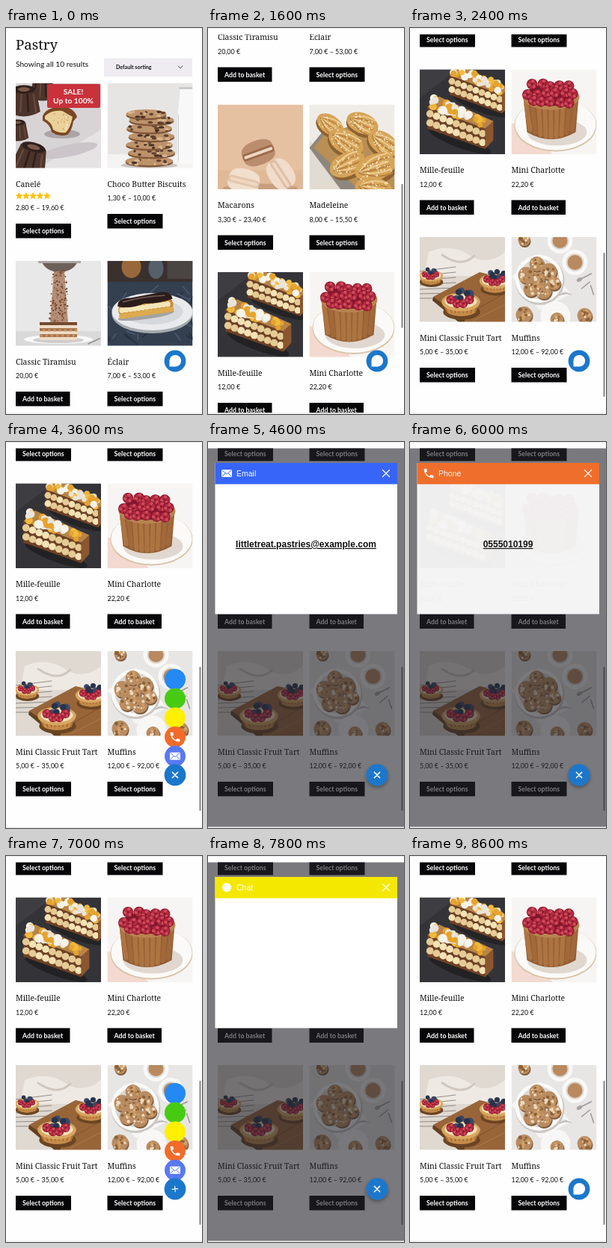
These frames come from a looping animation (262 px wide and 517 px high, 8.8 s). An HTML page:

```html
<!DOCTYPE html>
<html lang="en">
<head>
<meta charset="utf-8">
<style>
html, body { margin: 0; height: 100%; overflow: hidden; background: #fefefe; }
svg { display: block; width: 100vw; height: 100vh; }
text { font-family: Lato, sans-serif; fill: #111; }
.serif { font-family: "Noto Serif", serif; }
.sans { font-family: "Liberation Sans", Arial, sans-serif; }
.bold { font-weight: 700; }
.mid { text-anchor: middle; }
.white { fill: #fff; }
</style>
</head>
<body>
<svg id="stage" viewBox="0 0 262 517"></svg>
<script>
const LOOP = 8800, STEP = 200, MAX_SCROLL = 706;
const stage = document.getElementById('stage');

let seed = 7;
const rnd = (a = 0, b = 1) => {
  seed = (seed * 16807) % 2147483647;
  return a + (b - a) * seed / 2147483647;
};
const many = (n, fn) => Array.from({ length: n }, (_, i) => fn(i)).join('');
const pick = (...list) => list[Math.floor(rnd(0, list.length))];

// Shape helpers
const dot = (x, y, r, f) => `<circle cx="${x}" cy="${y}" r="${r}" fill="${f}"/>`;
const oval = (x, y, rx, ry, f, a = 0) =>
  `<ellipse cx="${x}" cy="${y}" rx="${rx}" ry="${ry}" fill="${f}" transform="rotate(${a} ${x} ${y})"/>`;
const box = (x, y, w, h, f, r = 0) =>
  `<rect x="${x}" y="${y}" width="${w}" height="${h}" rx="${r}" fill="${f}"/>`;
const path = (d, f) => `<path d="${d}" fill="${f}"/>`;
const line = (d, c, w) => `<path d="${d}" fill="none" stroke="${c}" stroke-width="${w}" stroke-linecap="round"/>`;
const put = (x, y, s, more = '') => `<g transform="translate(${x} ${y}) ${more}">${s}</g>`;
const text = (x, y, size, s, cls = '', more = '') =>
  `<text x="${x}" y="${y}" font-size="${size}" class="${cls}" ${more}>${s}</text>`;

// Photos, each 114 by 114
const canele = (x, y, s, a = 0) => put(x, y,
  path('M-14 -12Q0 -20 14 -12L19 14Q0 25 -19 14Z', '#4b342c') +
  oval(0, -12, 13, 5, '#30201c') + oval(0, -12, 7, 2.5, '#7b5a49') +
  many(4, i => line(`M${-10 + i * 7} -6L${-13 + i * 9} 14`, pick('#2d1d19', '#6a4a3c'), 2)), `rotate(${a}) scale(${s})`);

const canelePhoto = () => box(0, 0, 114, 114, '#d8d4d6') + path('M30 114L114 62V114Z', '#e6e3e4') +
  oval(72, 90, 38, 8, '#cbc4c8', -12) +
  canele(36, 6, .9) + canele(11, 22, 1.15) + canele(2, 62, .8) + canele(20, 100, 1.25, 15) +
  oval(62, 68, 24, 6, '#aca4a7') +
  path('M36 44Q40 33 60 31Q78 32 82 45L77 51Q75 64 69 69Q56 72 48 65Q46 55 36 50Z', '#794723') +
  path('M39 44Q48 35 62 37L76 45Q73 60 67 66Q56 67 50 62Q48 52 39 48Z', '#ead09a') +
  many(26, () => dot(rnd(50, 70), rnd(41, 63), rnd(.6, 1.6), pick('#d7ae69', '#f5e6c2')));

const biscuit = (x, y, w) => oval(x, y + 2, w, 6.5, '#82583a') + oval(x, y, w, 6, '#bd936b') +
  many(12, () => oval(x + rnd(-w, w) * .85, y + rnd(-3, 5), rnd(1.5, 4), 1.7, pick('#4b3024', '#60412f', '#d8b48e')));

const biscuitPhoto = () => box(0, 0, 114, 114, '#e7e5e4') + box(0, 95, 114, 19, '#f4f3f2') +
  path('M97 8H114V108H99Q93 106 94 96V42Q96 28 97 8Z', '#f8f8f8') + box(96, 5, 18, 3, '#c9c9ca') +
  line('M95 42V104', '#d0cfd0', 1) + oval(56, 110, 38, 4, '#c9c4c0') +
  many(6, i => biscuit(56 + (i % 2) * 3, 104 - i * 11, 32 - i * .4)) + biscuit(52, 41, 27);

const tiramisuPhoto = () => box(0, 0, 114, 114, '#e9e8e8') + box(0, 94, 114, 20, '#dad9d9') +
  path('M34 0H83Q78 14 58 15Q40 14 34 0Z', '#6d5f59') + box(30, 0, 57, 3, '#aaa6a5') +
  path('M51 14H65L70 84H46Z', '#b58e78') +
  many(170, () => { const y = rnd(12, 82); return dot(58 + rnd(-1, 1) * (9 + y * .05), y, rnd(.4, 1.3), pick('#83553a', '#a87555', '#6c432e')); }) +
  oval(57, 105, 46, 6, '#f8f8f8') + oval(57, 106, 34, 4, '#cfcccb') +
  many(3, i => box(32, 82 + i * 8, 50, 4, i ? '#a9764f' : '#744a31') + box(32, 86 + i * 8, 50, 4, '#eddcc8')) +
  many(14, i => dot(34 + i * 3.6, i % 2 ? 93 : 100, 1.8, '#c99563')) +
  line('M97 111L112 104', '#98928f', 1.5);

const eclairPhoto = () => box(0, 0, 114, 114, '#344050') + box(0, 0, 114, 28, '#3a312e') +
  oval(32, 8, 13, 15, '#99683a') + oval(65, 10, 10, 14, '#56606b') + box(80, 0, 34, 24, '#4a4443') +
  many(40, () => line(`M${rnd(0, 114)} ${rnd(32, 114)}l${rnd(-18, 18)} ${rnd(4, 13)}`, pick('#27313f', '#465569'), 2)) +
  oval(60, 71, 54, 26, '#a4a9ae') + oval(60, 68, 54, 25, '#e8eaec') + oval(60, 68, 41, 17, '#d5d9dc') +
  put(50, 60, oval(0, 13, 38, 5, '#a4a3a2') + box(-36, -7, 74, 19, '#c98c32', 9) +
    many(12, i => dot(-31 + i * 5.6, 2, 3.8, '#f4e5b9')) + box(-36, 6, 74, 7, '#ddaa4e', 4) +
    path('M-36 -4Q-35 -16 -17 -13L24 -15Q37 -15 38 -4Q20 0 0 -3Q-20 2 -36 -4Z', '#2d1c1c') +
    line('M-28 -9Q0 -13 28 -10', '#725d58', 1.5), 'rotate(-8)');

const macaron = (x, y, w, a, top, edge) => put(x, y,
  path(`M${-w} -2Q${-w} -16 0 -16T${w} -2Z`, top) + path(`M${-w} 4Q${-w} 17 0 17T${w} 4Z`, top) +
  box(-w, -4, w * 2, 10, edge, 4) + box(-w + 2, -1, w * 2 - 4, 4, '#eed8c4', 2), `rotate(${a})`);

const macaronPhoto = () => box(0, 0, 114, 114, '#e5c1a2') + box(0, 88, 114, 26, '#e0b998') +
  oval(57, 112, 50, 6, '#c79f7f') +
  macaron(35, 102, 21, 14, '#f1dfcd', '#e2c6ac') + macaron(85, 93, 21, 57, '#f1dccb', '#dfbfa7') +
  macaron(54, 64, 22, -20, '#bb8d6e', '#9c6c4c');

const madeleine = (x, y, a, s = 1) => put(x, y,
  oval(1, 4, 21, 13, '#8c6231') + oval(0, 0, 21, 13, '#d6a458') +
  many(6, i => line(`M-17 0Q${-4 + i} ${-12 + i * 5} ${14} ${-9 + i * 4}`, i % 2 ? '#b98340' : '#ecca8c', 1.7)) +
  many(55, () => dot(rnd(-16, 16), rnd(-9, 9), rnd(.3, .9), '#fbecd2')), `rotate(${a}) scale(${s})`);

const madeleinePhoto = () => box(0, 0, 114, 114, '#efece8') + path('M0 48L62 114H0Z', '#e2dbd1') +
  path('M0 58L18 36L84 114H42Z', '#8e877d') + path('M6 58L20 40L70 24L114 60V114H66Z', '#b98f55') +
  madeleine(28, 27, 35, .95) + madeleine(71, 25, 22, 1.05) + madeleine(49, 50, 30, 1.2) +
  madeleine(99, 52, 35, 1.1) + madeleine(51, 80, -25, 1.2) + madeleine(88, 84, -20, 1.35) + madeleine(86, 113, 10, 1.2);

const slice = (x, y, s) => put(x, y,
  path('M-36 -14L34 12V37L-36 12Z', '#6d4125') +
  many(2, r => line(`M-36 ${-6 + r * 12}L34 ${19 + r * 12}`, '#a96f3a', 3) +
    many(9, i => dot(-33 + i * 8, -6 + r * 11 + i * 3, 4.4, pick('#f3e2b6', '#e5cb95')))) +
  path('M34 12L44 3V26L34 37Z', '#8b5630') + path('M-36 -14L-22 -27L44 3L34 12Z', '#b98445') +
  many(34, i => { const k = rnd(); return dot(-31 + k * 66, -19 + k * 25 + rnd(-9, 5), rnd(3, 5.5), i % 2 ? pick('#f1b93e', '#e6a42c') : pick('#f7f3ea', '#e9e4da')); }), `scale(${s})`);

const millePhoto = () => box(0, 0, 114, 114, '#343438') + path('M0 0H50L0 38Z', '#3e3e42') +
  oval(82, 48, 40, 9, '#242427', 20) + slice(76, 22, 1) + oval(54, 96, 44, 9, '#222225', 20) + slice(50, 66, 1.1);

const raspberry = (x, y, r = 5) => dot(x, y, r, '#8f1930') +
  many(7, i => dot(x + Math.cos(i) * r * .55, y + Math.sin(i) * r * .55, r * .32, i % 2 ? '#cf4b5a' : '#b32a40'));

const charlottePhoto = () => box(0, 0, 114, 114, '#f7f5f3') + path('M0 72Q35 78 55 114H0Z', '#f3d9cf') +
  oval(59, 75, 55, 35, '#d9c3a8') + oval(59, 74, 54, 34, '#fbfaf8') + oval(61, 84, 40, 18, '#e0d8d0') +
  path('M16 36L21 84Q53 103 86 84L90 36Z', '#925c33') +
  many(9, i => line(`M${20 + i * 8.2} 47L${25 + i * 7} ${81 + Math.sin(i / 8 * Math.PI) * 9}`, pick('#ad7442', '#a1683a'), 6.2)) +
  oval(53, 37, 38, 17, '#b98450') + oval(53, 34, 33, 15, '#7d182b') +
  many(3, r => many(5 + r % 2, i => raspberry(29 + i * 12 - (r % 2) * 6 + rnd(-2, 2), 21 + r * 11 + rnd(-2, 2), 7.3)));

const tart = (x, y, s) => put(x, y,
  oval(1, 13, 24, 10, '#6b4522') + path('M-25 -2L-18 14Q0 23 19 14L25 -2Z', '#c58b49') +
  many(8, i => line(`M${-21 + i * 6} 5L${-17 + i * 5} 14`, '#985f29', 1)) +
  oval(0, 0, 25, 12, '#d8a660') + oval(0, -1, 21, 9, '#f3e0b8') +
  many(9, () => dot(rnd(-8, 14), rnd(-15, -3), 4.2, pick('#29334c', '#3c4968'))) +
  many(4, i => raspberry(-13 + i * 8, i % 3 ? 2 : -3, 6)), `scale(${s})`);

const tartPhoto = () => box(0, 0, 114, 114, '#dfd9d2') +
  path('M12 20Q42 8 66 24T114 20V52H6Z', '#eee9e2') + line('M30 24Q56 42 73 25', '#cfc7be', 3) +
  many(7, i => line(`M0 ${46 + i * 6}L48 ${40 + i * 7}`, '#7d7670', .8)) +
  path('M18 80L80 47L114 55V114H60Z', '#986539') + path('M18 80L60 110V114H52L17 85Z', '#63411f') +
  line('M65 103L114 75', '#7f5029', 1) + line('M72 112L114 90', '#ad7b45', 1) +
  tart(15, 52, .65) + tart(101, 59, .85) + tart(55, 87, 1.03);

const muffin = (x, y, r) => dot(x + 1, y + 2, r, '#805c3c') + dot(x, y, r, '#b98c62') +
  many(14, () => dot(x + rnd(-.65, .65) * r, y + rnd(-.65, .65) * r, rnd(1, 2.6), pick('#ecd9bd', '#8c6138', '#d0a067')));
const cup = (x, y, r) => dot(x, y, r + 5, '#f8f8f7') + dot(x, y, r, '#ddd8d2') + dot(x, y, r - 2, '#b98a5f');

const muffinPhoto = () => box(0, 0, 114, 114, '#e8e6e4') +
  path('M0 53L38 22L79 76L38 98Z', '#f6f5f3') +
  many(9, i => line(`M${40 + i * 4} ${90 - i * 2}L${56 + i * 3} ${69 + i}`, '#aaa7a7', .8)) +
  cup(65, 5, 12) + cup(85, 34, 12) + dot(38, 58, 33, '#cbc7c3') + dot(37, 56, 32, '#fafaf9') + dot(37, 56, 27, '#dcd8d4') +
  muffin(34, 36, 10) + muffin(50, 46, 11) + muffin(20, 51, 11) + muffin(35, 57, 10) + muffin(26, 70, 10) + muffin(43, 72, 11) + muffin(57, 62, 9) +
  line('M91 57L107 49M94 69L105 60M106 65L110 77', '#9c9896', 1.5) + oval(91, 57, 4, 2.5, '#aaa5a2', -28) +
  dot(59, 106, 20, '#f8f7f6') + muffin(61, 110, 9) + muffin(98, 105, 10) + muffin(17, 104, 11) + muffin(17, 4, 8);

const items = [
  ['Canelé', '2,80 € – 19,60 €', canelePhoto],
  ['Choco Butter Biscuits', '1,30 € – 10,00 €', biscuitPhoto],
  ['Classic Tiramisu', '20,00 €', tiramisuPhoto],
  ['Éclair', '7,00 € – 53,00 €', eclairPhoto],
  ['Macarons', '3,30 € – 23,40 €', macaronPhoto],
  ['Madeleine', '8,00 € – 15,50 €', madeleinePhoto],
  ['Mille-feuille', '12,00 €', millePhoto],
  ['Mini Charlotte', '22,20 €', charlottePhoto],
  ['Mini Classic Fruit Tart', '5,00 € – 35,00 €', tartPhoto],
  ['Muffins', '12,00 € – 92,00 €', muffinPhoto]
];
const rowTops = [74, 312, 537, 761.5, 986];

const card = ([name, price, photo], i) => {
  const drop = i ? 0 : 13, single = !price.includes('–');
  return put(i % 2 ? 135.5 : 13, rowTops[i >> 1],
    `<g clip-path="url(#photo)"><g filter="url(#soft)">${photo()}</g></g>` + text(0, 138.5, 10.4, name, 'serif') +
    text(0, 157 + drop, 8.9, price) + box(0, 175 + drop, single ? 72.5 : 74, 19.5, '#060608') +
    text(9, 188 + drop, 8.8, single ? 'Add to basket' : 'Select options', 'bold white'));
};

const star = i => put(17.5 + i * 9.3, 225,
  path('M' + many(10, k => { const r = k % 2 ? 2.6 : 5.2, a = k * Math.PI / 5; return `${(Math.sin(a) * r).toFixed(2)} ${(-Math.cos(a) * r).toFixed(2)} `; }) + 'Z', '#fcc30f'));

const heading = text(13, 29, 18.7, 'Pastry', 'serif') + text(13, 51.5, 10.2, 'Showing all 10 results') +
  box(131, 40.5, 118, 24.5, '#eeecf1') + text(147, 55, 7.1, 'Default sorting', 'bold') +
  line('M230 51L233 54L236 51', '#444', .9);
const badge = box(55, 75, 71, 32, '#c9323b', 2) +
  text(90, 89, 10.2, 'SALE!', 'bold white mid') + text(90, 101, 10.2, 'Up to 100%', 'bold white mid');

// Contact widget
const envelope = (x, y, c) => put(x, y, box(-7, -5, 14, 10, '#fff', 1) + line('M-6 -4L0 1L6 -4M-6 4L-2 0M6 4L2 0', c, 1));
const handset = (x, y) => put(x - 8.5, y - 8.5, path('M6.6 10.8c1.4 2.8 3.8 5.1 6.6 6.6l2.2-2.2c.3-.3.7-.4 1-.2 1.1.4 2.3.6 3.6.6.6 0 1 .4 1 1V20c0 .6-.4 1-1 1C10.6 21 3 13.4 3 4c0-.6.5-1 1-1h3.5c.6 0 1 .4 1 1 0 1.2.2 2.4.6 3.6.1.3 0 .7-.2 1z', '#fff'), 'scale(.71)');
const cross = (r, w) => line(`M${-r} ${-r}L${r} ${r}M${r} ${-r}L${-r} ${r}`, '#fff', w);

const popup = (id, color, title, icon, body) => `<g id="${id}">` +
  box(9.5, 28, 243.5, 202.5, '#fff') + box(9.5, 28, 243.5, 28.5, color) + icon +
  text(38, 45.5, 10.5, title, 'sans white') + put(238, 42, cross(4.5, 1.2)) +
  text(131, 141, 12, body, 'sans bold mid', 'text-decoration="underline"') + '</g>';

const menu = many(5, i => dot(226, 318 + i * 25.7, 14, ['#2489f5', '#47cb12', '#fff000', '#f36b29', '#5879f3'][i])) +
  handset(226, 395.1) + envelope(226, 420.8, '#5879f3');

stage.innerHTML = `<defs>
  <clipPath id="photo"><rect width="114" height="113.5"/></clipPath>
  <clipPath id="view"><rect y="8.5" width="262" height="507"/></clipPath>
  <filter id="soft" x="0" y="0" width="100%" height="100%"><feGaussianBlur stdDeviation=".6"/></filter>
  <filter id="shade" x="-50%" y="-50%" width="200%" height="200%"><feDropShadow dx="0" dy="2" stdDeviation="2.5" flood-opacity=".4"/></filter>
  </defs>` + box(0, 0, 262, 517, '#fefefe') + box(0, 0, 262, 1, '#ececee') +
  `<g clip-path="url(#view)"><g id="page">${heading}${items.map(card).join('')}${badge}${many(5, star)}</g>
  <g id="bar">${box(258.5, 0, 2, 193, '#838385', 1)}</g></g>` +
  box(0, 515.5, 262, 1, '#e6e6e8') +
  `<g id="cover">${box(0, 8.5, 262, 507, 'rgba(36,36,43,.6)')}</g>` +
  popup('mail', '#3765fa', 'Email', envelope(25, 42, '#3765fa'), 'littletreat.pastries@example.com') +
  popup('phone', '#f96e24', 'Phone', handset(25, 42), '0555010199') +
  popup('chat', '#f5e800', 'Chat', dot(25, 42, 6, '#fff'), '') +
  `<g id="menu">${menu}</g><g id="button">${dot(226, 446, 14.4, '#1b77cb')}</g>` +
  put(226, 446, '<g id="bubble">' + dot(.3, -.3, 7.8, '#fff') + path('M-7.5 0V7.5H0Z', '#fff') + '</g>' +
    `<g id="close">${cross(3.6, 1.5)}</g>`);

const el = id => document.getElementById(id);
const show = (id, alpha) => el(id).setAttribute('opacity', +alpha);
const move = (id, how) => el(id).setAttribute('transform', how);
const within = (t, a, b) => t >= a && t < b;

const popups = [['mail', 3800, 5200], ['phone', 6000, 6800], ['chat', 7600, 8600]];
const menus = [[3000, 3800], [5400, 6000], [7000, 7600]];

function draw() {
  const t = Math.floor(performance.now() % LOOP / STEP) * STEP;
  const scroll = MAX_SCROLL * Math.min(1, Math.max(0, (t - 320) / 2080));
  move('page', `translate(0 ${-scroll})`);
  move('bar', `translate(0 ${61 + scroll * .34})`);
  show('bar', t >= 400);

  let covered = false;
  for (const [id, a, b] of popups) {
    const on = within(t, a, b);
    covered ||= on;
    show(id, on ? (t === a ? .92 : 1) : 0);
  }
  const open = menus.find(([a, b]) => within(t, a, b));
  show('cover', covered);
  show('menu', !!open);
  show('bubble', !open && !covered);
  show('close', !!open || covered);
  move('close', open && t === open[0] ? 'rotate(40) scale(.75)' : '');
  el('button').setAttribute('filter', covered ? 'url(#shade)' : 'none');
  requestAnimationFrame(draw);
}
draw();
</script>
</body>
</html>
```
